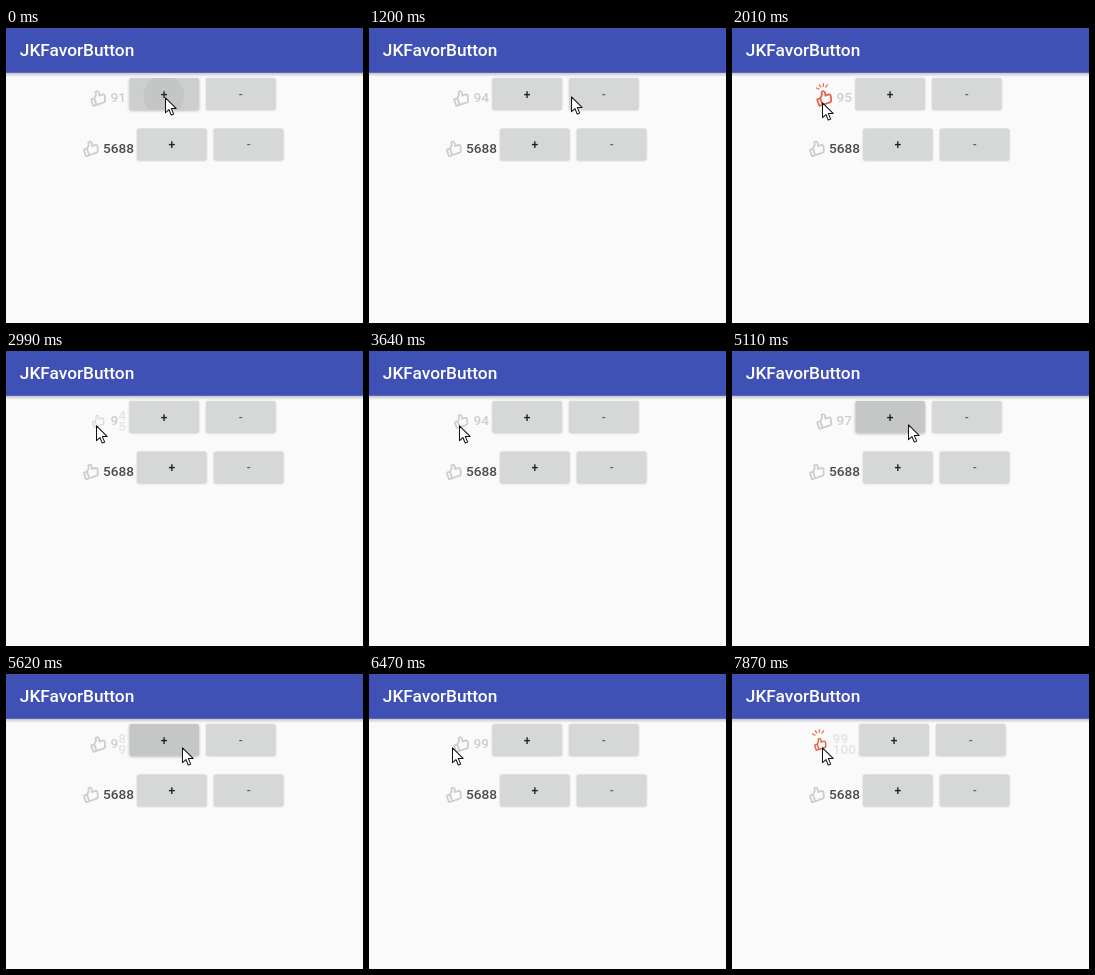
Recreate the animation shown at these times as an HTML page with a canvas. Size 357x295 px, loop 8 s.

```html
<!DOCTYPE html>
<html lang="en">
<head>
<meta charset="utf-8">
<title>JKFavorButton</title>
<style>
html, body { margin: 0; width: 100%; height: 100%; overflow: hidden; background: #fafafa; }
canvas { display: block; width: 357px; height: 295px; }
</style>
</head>
<body>
<canvas id="stage"></canvas>
<script>
const W = 357, H = 295, LOOP = 8000;
const GREY = '#cdcdcd', RED = '#e8614d';
const canvas = document.getElementById('stage');
const ctx = canvas.getContext('2d');
const dpr = window.devicePixelRatio || 1;
canvas.width = W * dpr;
canvas.height = H * dpr;

// The screen refreshes in steps; all times below count these steps.
const toStep = ms => Math.floor(ms / 134.7 + .12);

const START = 91;
const favorClicks = [12, 18, 22, 26, 54, 58];
// Runs of clicks on "+", one every second step
const runs = [
  { down: 0, first: 4, last: 8 },
  { down: 32, first: 33, last: 41 }
];
const moves = [
  { from: 0, to: 0, x: 159, y: 69 },
  { from: 8, to: 9, x: 202, y: 68 },
  { from: 9, to: 11, x: 90, y: 74 },
  { from: 28, to: 31, x: 176, y: 73 },
  { from: 44, to: 48, x: 83, y: 73 },
  { from: 50, to: 51, x: 90, y: 73 }
];

const clamp = v => Math.max(0, Math.min(1, v));
const easeOut = p => 1 - (1 - p) ** 3;

const likedAt = s => favorClicks.filter(c => c <= s).length % 2;
const plusesAt = s => runs.reduce((sum, { first, last }) =>
  s < first ? sum : sum + Math.floor((Math.min(s, last) - first) / 2) + 1, 0);
const countAt = s => START + plusesAt(s) + likedAt(s);

function pointerAt(s) {
  let { x, y } = moves[0];
  for (const m of moves.slice(1)) {
    const p = easeOut(clamp((s - m.from) / (m.to - m.from)));
    x += (m.x - x) * p;
    y += (m.y - y) * p;
  }
  return [x, y];
}

function text(str, x, y, size, color, align = 'left') {
  ctx.font = `500 ${size}px Roboto, sans-serif`;
  ctx.textAlign = align;
  ctx.fillStyle = color;
  ctx.fillText(str, x, y);
}

function header() {
  const shade = ctx.createLinearGradient(0, 44, 0, 49);
  shade.addColorStop(0, 'rgba(0,0,0,.26)');
  shade.addColorStop(1, 'rgba(0,0,0,0)');
  ctx.fillStyle = shade;
  ctx.fillRect(0, 44, W, 5);
  ctx.fillStyle = '#3f51b5';
  ctx.fillRect(0, 0, W, 44.8);
  text('JKFavorButton', 13.8, 27.6, 17.3, '#fff');
}

function button(x, y, label, { raised = false, ripple = '' } = {}) {
  const w = 69.6, h = 31.7;
  ctx.save();
  ctx.shadowColor = `rgba(0,0,0,${raised ? .27 : .2})`;
  ctx.shadowBlur = (raised ? 3 : 2) * dpr;
  ctx.shadowOffsetY = (raised ? 1 : .6) * dpr;
  ctx.beginPath();
  ctx.roundRect(x, y, w, h, 2);
  ctx.fillStyle = '#d6d7d7';
  ctx.fill();
  ctx.restore();
  if (ripple) {
    ctx.save();
    ctx.clip();
    ctx.fillStyle = `rgba(0,0,0,${ripple === 'full' ? .08 : .045})`;
    ctx.fillRect(x, y, w, h);
    if (ripple === 'circle') {
      ctx.beginPath();
      ctx.arc(x + 34.5, y + 17.5, 20.5, 0, 7);
      ctx.fill();
    }
    ctx.restore();
  }
  text(label, x + w / 2, y + 21, 12, label === '-' ? '#666' : '#222', 'center');
}

function thumb(x, y, color, scale = 1) {
  ctx.save();
  ctx.translate(x, y);
  ctx.rotate(-.33);
  ctx.scale(scale, scale);
  ctx.strokeStyle = color;
  ctx.lineWidth = 1.8;
  ctx.lineJoin = ctx.lineCap = 'round';
  ctx.beginPath();
  ctx.roundRect(-7, -1, 3.4, 7, .8);
  ctx.moveTo(-3.6, -.8);
  ctx.lineTo(-.8, -3.8);
  ctx.lineTo(-.3, -6.4);
  ctx.quadraticCurveTo(2.6, -7.6, 2.6, -4.4);
  ctx.lineTo(2, -1.8);
  ctx.lineTo(5.8, -1.8);
  ctx.quadraticCurveTo(7.4, -1.4, 7.1, .4);
  ctx.lineTo(5.8, 5);
  ctx.quadraticCurveTo(5.4, 6, 4.2, 6);
  ctx.lineTo(-3.6, 6);
  ctx.stroke();
  ctx.restore();
}

function sparks(x, y, scale) {
  ctx.save();
  ctx.translate(x, y);
  ctx.scale(scale, scale);
  ctx.strokeStyle = '#ec7767';
  ctx.lineWidth = 1.4;
  ctx.lineCap = 'round';
  for (let i = 0; i < 4; i++) {
    const a = -2.75 + i * .6, c = Math.cos(a), s = Math.sin(a);
    ctx.beginPath();
    ctx.moveTo(c * 4.6, s * 4.6);
    ctx.lineTo(c * 7.2, s * 7.2);
    ctx.stroke();
  }
  ctx.restore();
}

// Changed digits roll up or down; a change of length rolls the whole number.
function rollDigits(from, to, x, y) {
  const size = 13.7, half = to > from ? 5.2 : -5.2;
  const a = String(from), b = String(to);
  const roll = (old, now, dx) => {
    if (old === now) return text(now, x + dx, y, size, GREY);
    ctx.globalAlpha = .5;
    text(old, x + dx, y - half, size, GREY);
    text(now, x + dx, y + half, size, GREY);
    ctx.globalAlpha = 1;
  };
  if (a.length !== b.length) return roll(a, b, 0);
  [...b].forEach((ch, i) => roll(a[i], ch, i * size * .57));
}

function favor(s) {
  const count = countAt(s), before = countAt(s - 1);
  const shift = Math.max(count, before) > 99 ? 3.9 : 0;
  const x = 92 - shift;

  const age = s - (favorClicks.findLast(c => c <= s) ?? -9);
  const red = likedAt(age ? s : s - 1);
  const grown = Math.min(1, .8 + age * .1);
  ctx.globalAlpha = age || red ? 1 : .7;
  thumb(x, 70, red ? RED : GREY, grown);
  ctx.globalAlpha = 1;
  if (red) sparks(x - .8, 62.8, age === 1 ? .7 : 1);
  rollDigits(before, count, 104.5 - shift, 74.4);

  const run = runs.find(r => s >= r.down - 1 && s <= r.last);
  const ripple = !run || s < run.down ? '' : s < run.first - 1 ? 'circle' : 'full';
  button(123.4 + shift, 50, '+', { raised: !!run, ripple });
  button(200 + shift, 50, '-');
}

function arrow(x, y) {
  ctx.save();
  ctx.translate(x + .5, y + .8);
  ctx.scale(.93, .93);
  ctx.beginPath();
  [[0, 0], [0, 16], [3.7, 12.6], [6.2, 18.6], [8.8, 17.5], [6.3, 11.6], [11.4, 11.4]]
    .forEach(([px, py]) => ctx.lineTo(px, py));
  ctx.closePath();
  ctx.fillStyle = '#fff';
  ctx.fill();
  ctx.strokeStyle = '#111';
  ctx.lineWidth = 1.1;
  ctx.lineJoin = 'round';
  ctx.stroke();
  ctx.restore();
}

function render(ms) {
  const s = toStep(ms);
  ctx.setTransform(dpr, 0, 0, dpr, 0, 0);
  ctx.fillStyle = '#fafafa';
  ctx.fillRect(0, 0, W, H);
  header();
  favor(s);
  thumb(84.7, 120.4, GREY);
  text('5688', 97, 124.8, 13.7, '#4a4a4a');
  button(131, 100.4, '+');
  button(207.8, 100.4, '-');
  arrow(...pointerAt(s));
}

const start = performance.now();
function loop() {
  render((performance.now() - start) % LOOP);
  requestAnimationFrame(loop);
}
loop();
</script>
</body>
</html>
```
